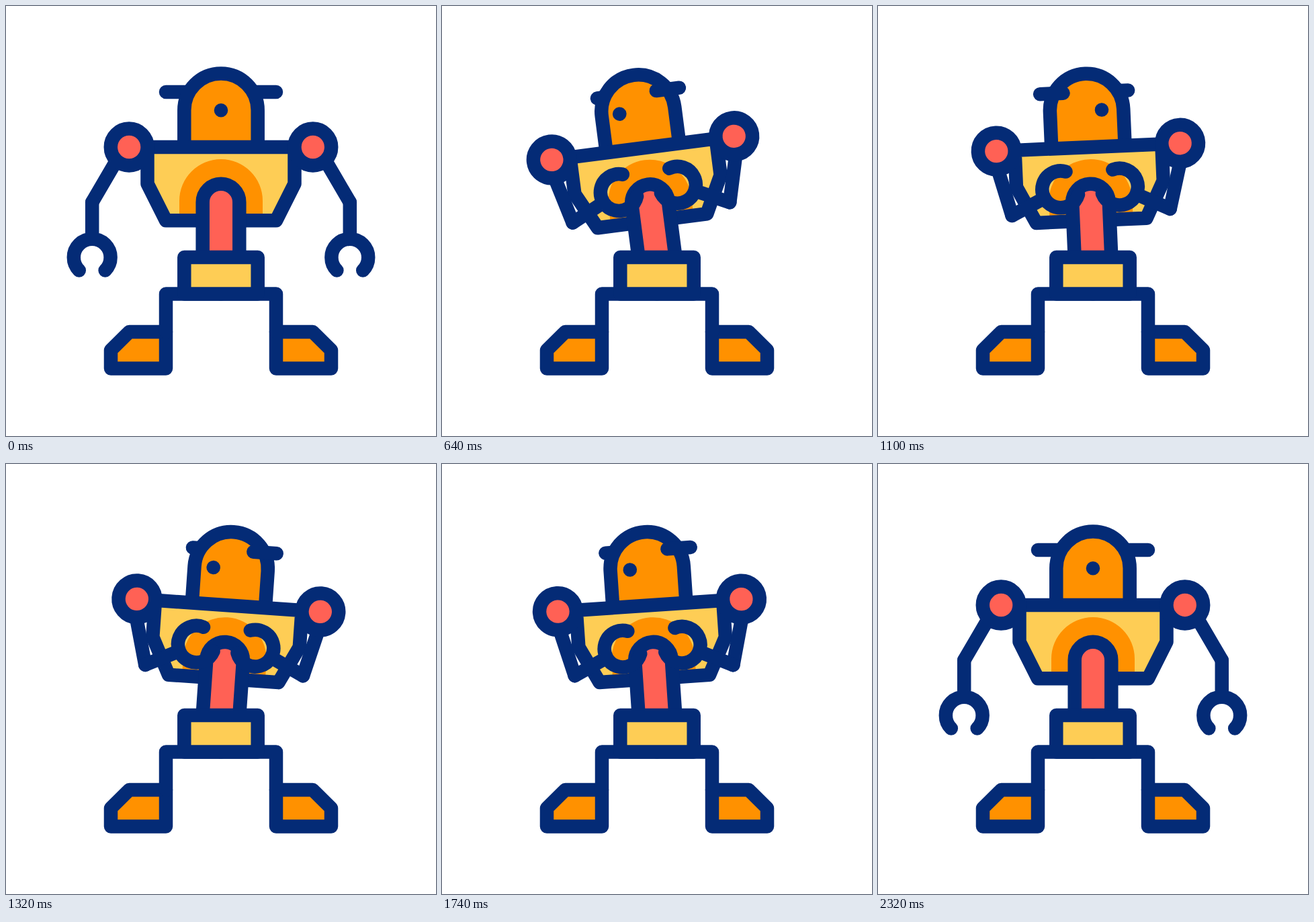
An HTML page that plays this animation: 640 px wide and 640 px high, repeating every 2400 ms.

```html
<!DOCTYPE html>
<html lang="en">
<head>
<meta charset="utf-8">
<title>Dancing robot</title>
<style>
  html, body { margin: 0; height: 100%; overflow: hidden; background: #fff; }
  svg { display: block; width: 100%; height: 100%; }
  path, circle { vector-effect: non-scaling-stroke; }
</style>
</head>
<body>
<svg viewBox="0 0 640 640" fill="none" stroke="#042b76" stroke-width="20.5" stroke-linecap="round" stroke-linejoin="round">
  <g id="body">
    <path id="farEar" d="M47.5 128H82"/>
    <path fill="#ff9100" d="M265.3 210V155.3a54.7 54.7 0 0 1 109.4 0V210"/>
    <path id="nearEar" d="M47.5 128H82"/>
    <circle id="eye" cx="320" cy="155.3" r="10.3" fill="#042b76" stroke="none"/>
    <path fill="#fecd55" stroke="none" d="M210.5 210H429.5V264.7L402 319.3H238L210.5 264.7Z"/>
    <path fill="#ff9100" stroke="none" d="M258 319V290a62 62 0 0 1 124 0V319Z"/>
    <path d="M210.5 210H429.5V264.7L402 319.3H238L210.5 264.7Z"/>
    <path fill="#ff6155" d="M292.7 374V292a27.3 27.3 0 0 1 54.6 0V374"/>
  </g>
  <g id="legs">
    <g id="leg">
      <path fill="#ff9100" d="M238 485H183.5L156 512.3V539.5H238Z"/>
      <path d="M238 485V428.5H320"/>
    </g>
    <use href="#leg" transform="translate(640) scale(-1 1)"/>
    <path fill="#fecd55" d="M265.3 374H374.7V428.5H265.3Z"/>
  </g>
  <g id="arms">
    <g id="side">
      <g id="arm">
        <path d="M164.5 230L128.2 292"/>
        <g id="forearm">
          <path d="M0 0V54.7M-19.4 101.5A27.4 27.4 0 1 1 19.4 101.5"/>
        </g>
      </g>
      <circle cx="183.2" cy="210" r="27.4" fill="#ff6155"/>
    </g>
    <use href="#side" transform="translate(640) scale(-1 1)"/>
  </g>
</svg>
<script>
const LOOP = 2400, LOOK = 28, BEND = 71 * Math.PI / 180;
const part = id => document.getElementById(id);
const place = (id, transform) => part(id).setAttribute('transform', transform);

const sine = x => (1 - Math.cos(Math.PI * x)) / 2;

// Cubic bezier easing (.9, 0, .2, 1), solved by bisection
function snap(x) {
  let lo = 0, hi = 1, u = 0.5;
  for (let i = 0; i < 24; i++) {
    u = (lo + hi) / 2;
    const v = 1 - u;
    if (2.7 * v * v * u + 0.6 * v * u * u + u * u * u < x) lo = u; else hi = u;
  }
  return u * u * (3 - 2 * u);
}

function track(keys, t, ease) {
  if (t >= keys[keys.length - 1][0]) return keys[keys.length - 1][1];
  const i = keys.findIndex(key => key[0] > t);
  const [t0, a] = keys[i - 1], [t1, b] = keys[i];
  return a + (b - a) * ease((t - t0) / (t1 - t0));
}

const TILT = [[0, 0], [667, -7.4], [917, 8], [1167, -4.5], [1417, 8], [1667, -4], [2333, 0]];
const GAZE = [[0, 0], [667, -1], [917, 1], [1417, -1], [2333, 0]];
const LIFT = [[0, 0], [667, 1], [1667, 1], [2333, 0]];

function draw(t) {
  const tilt = track(TILT, t, sine);
  const gaze = track(GAZE, t, snap);
  const lift = track(LIFT, t, snap);

  for (const id of ['body', 'arms']) place(id, `rotate(${tilt} 320 373.5)`);

  // The ear turned towards the viewer passes in front of the head
  const side = gaze > 0 ? -1 : 1, turn = Math.abs(gaze);
  place('eye', `translate(${LOOK * gaze})`);
  place('nearEar', `translate(320) scale(${side} 1) translate(${-17 * turn})`);
  place('farEar', `translate(320) scale(${-side} 1) translate(${-24 * turn})`);

  // Forearm points move in straight lines, so it shortens halfway
  const c = 1 - lift + lift * Math.cos(BEND), s = lift * Math.sin(BEND);
  place('arm', `rotate(${-45 * lift} 183.2 210)`);
  place('forearm', `matrix(${c} ${-s} ${s} ${c} 128.2 292)`);
}

function tick() {
  draw(performance.now() % LOOP);
  requestAnimationFrame(tick);
}
tick();
</script>
</body>
</html>
```
